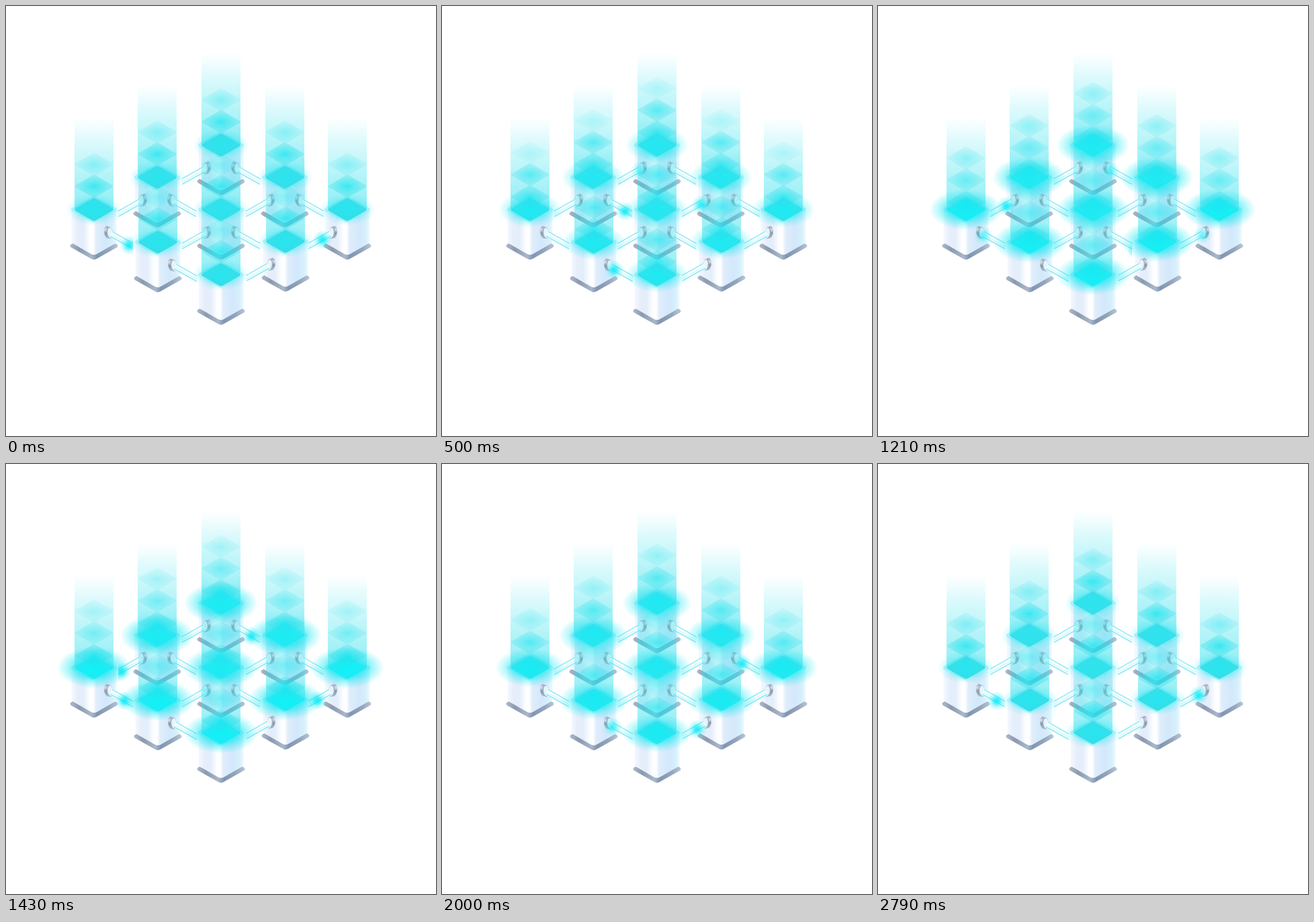
An HTML page with a canvas that plays this animation: 640x640 px, repeating every 2.87 s.

```html
<!DOCTYPE html>
<html lang="en">
<head>
<meta charset="utf-8">
<title>Linked cubes</title>
<style>
html, body { margin: 0; width: 100%; height: 100%; overflow: hidden; background: #fff; }
canvas { display: block; width: 100vw; height: 100vh; }
</style>
</head>
<body>
<canvas id="stage" width="640" height="640"></canvas>
<script>
(() => {
const ctx = document.getElementById('stage').getContext('2d');
const LOOP = 2870, STEPS = 40;
const SPEED = 0.09;   // pulse travel along x, px per ms
const RISE = 99, BEAM = 137;

// Top-face centre, then the start times of pulses in the left and right pipes.
const cubes = [
  { x: 320, y: 207, left: [455, 2068], right: [1166, 2212] },
  { x: 225, y: 255, left: [1077], right: [211, 2123] },
  { x: 415, y: 255, left: [411], right: [1890] },
  { x: 131, y: 303, right: [1166, 2525] },
  { x: 320, y: 303, left: [1432, 2257], right: [735] },
  { x: 508, y: 303, left: [1175, 2692] },
  { x: 226, y: 351.5, right: [400, 1935] },
  { x: 416, y: 350.5, left: [557, 1840] },
  { x: 320, y: 400 }
];

// Rising plates: phase and strength
const plates = [[0.02, 0.78], [0.68, 0.9], [0.35, 1.15]];

const cyan = a => `rgba(20,232,242,${a})`;

function fade(gradient, ...stops) {
  for (const [at, color] of stops) gradient.addColorStop(at, color);
  return gradient;
}

function diamond(y, w, h, r) {
  ctx.beginPath();
  ctx.moveTo(-w / 2, y - h / 2);
  ctx.arcTo(0, y - h, w, y, r);
  ctx.arcTo(w, y, 0, y + h, r * 0.35);
  ctx.arcTo(0, y + h, -w, y, r);
  ctx.arcTo(-w, y, 0, y - h, r * 0.35);
  ctx.closePath();
}

function glow(x, y, rx, ry, ...stops) {
  ctx.save();
  ctx.translate(x, y);
  ctx.scale(rx, ry);
  ctx.fillStyle = fade(ctx.createRadialGradient(0, 0, 0, 0, 0, 1), ...stops);
  ctx.fillRect(-1, -1, 2, 2);
  ctx.restore();
}

function drawBody() {
  diamond(54, 38, 21.5, 7);
  ctx.fillStyle = fade(ctx.createLinearGradient(-37, 0, 37, 0),
    [0, '#b3bdcc'], [0.2, '#8b99af'], [0.45, '#a9b8cb'], [0.56, '#8295b0'], [0.8, '#95a6bd'], [1, '#bccada']);
  ctx.fill();

  ctx.beginPath();
  ctx.moveTo(-33.5, 0);
  ctx.lineTo(0, -18);
  ctx.lineTo(33.5, 0);
  ctx.arcTo(33.5, 49.5, 0, 68, 3);
  ctx.arcTo(0, 68.5, -33.5, 49.5, 9);
  ctx.arcTo(-33.5, 49.5, -33.5, 0, 3);
  ctx.closePath();
  ctx.fillStyle = fade(ctx.createLinearGradient(-34, 0, 34, 0),
    [0, '#f6faff'], [0.14, '#e6eefb'], [0.27, '#e4edfa'], [0.4, '#fbfdff'], [0.48, '#ffffff'],
    [0.55, '#e0edfb'], [0.75, '#d3e8fb'], [0.9, '#d6effc'], [1, '#eefaff']);
  ctx.fill();
}

function drawFace(p) {
  const rx = 42 + 13 * p;
  diamond(0, 37, 20.5, 8);
  ctx.fillStyle = 'rgba(196,241,250,0.9)';
  ctx.fill();
  glow(0, 0, rx, rx * 0.56,
    [0, cyan(0.5 + 0.3 * p)], [0.5, cyan(0.4 + 0.25 * p)], [0.75, cyan(0.16 + 0.14 * p)], [1, cyan(0)]);
  diamond(0, 30.5, 17.5, 6);
  ctx.fillStyle = `rgb(${50 - 38 * p},${218 + 22 * p},${228 + 17 * p})`;
  ctx.fill();
}

function drawBeam(p) {
  ctx.beginPath();
  ctx.moveTo(-29, -BEAM);
  ctx.lineTo(29, -BEAM);
  ctx.lineTo(29, 0);
  ctx.lineTo(0, 17);
  ctx.lineTo(-29, 0);
  ctx.closePath();
  ctx.fillStyle = fade(ctx.createLinearGradient(0, -BEAM, 0, 17),
    [0, 'rgba(60,226,238,0)'], [0.25, 'rgba(60,226,238,0.19)'],
    [0.6, 'rgba(60,226,238,0.41)'], [0.88, 'rgba(60,226,238,0.58)'], [1, 'rgba(60,226,238,0.3)']);
  ctx.fill();
  glow(0, 0, 28, 16, [0, `rgba(5,245,250,${0.3 + 0.5 * p})`], [1, 'rgba(5,245,250,0)']);
}

function drawPlate(t, phase, power) {
  const u = (t / LOOP + phase) % 1;
  const a = power * Math.min(1, u * 8) * Math.pow(1 - u, 0.85);
  ctx.save();
  ctx.translate(0, -RISE * u);
  diamond(0, 30, 17.5, 6);
  ctx.clip();
  ctx.fillStyle = `rgba(50,218,230,${0.36 * a})`;
  ctx.fillRect(-30, -18, 60, 36);
  glow(0, 0, 23, 14, [0, cyan(Math.min(1, 0.85 * a))], [0.35, cyan(0.5 * a)], [1, cyan(0)]);
  ctx.restore();
}

function line(x1, y1, x2, y2, width, color) {
  ctx.beginPath();
  ctx.moveTo(x1, y1);
  ctx.lineTo(x2, y2);
  ctx.lineWidth = width;
  ctx.strokeStyle = color;
  ctx.stroke();
}

function oval(x, y, rx, ry, fill) {
  ctx.beginPath();
  ctx.ellipse(x, y, rx, ry, -0.12, 0, 7);
  ctx.fillStyle = fill;
  ctx.fill();
}

function drawPipe(side, starts, t) {
  ctx.save();
  ctx.scale(side, 1);
  ctx.translate(21, 34);

  const metal = fade(ctx.createLinearGradient(0, -10, 0, 10),
    [0, '#8f9fb2'], [0.3, '#d5dee8'], [0.55, '#8796a9'], [1, '#b9c6d4']);
  oval(-1, -0.3, 4.8, 9.3, metal);
  oval(2.2, 0.6, 4.4, 8.8, '#9aaec1');
  oval(3, 0.8, 3.8, 7.8, '#e6f4fa');

  line(4, 2, 37, 20.5, 10, 'rgba(222,247,252,0.85)');
  line(4, 2, 37, 20.5, 7, '#fafeff');
  line(6, -1.3, 37, 16.2, 1.3, '#83e9f2');
  line(3, 5.4, 37, 24.4, 1.3, '#83e9f2');
  line(5, 3.2, 37, 21.2, 1, 'rgba(150,236,245,0.55)');

  // Pulses vanish at the edge of the next cube.
  ctx.beginPath();
  ctx.rect(-16, -20, 53, 64);
  ctx.clip();
  for (const start of starts) {
    const d = ((t - start + LOOP) % LOOP) * SPEED;
    if (d > 54) continue;
    const a = Math.min(1, 0.25 + d / 12);
    glow(d, 2 + d * 0.55, 14.5, 14.5,
      [0, `rgba(10,238,250,${0.95 * a})`], [0.28, `rgba(20,236,248,${0.75 * a})`],
      [0.6, cyan(0.28 * a)], [1, cyan(0)]);
  }
  ctx.restore();
}

function draw(t) {
  const p = Math.pow(Math.sin(Math.PI * t / LOOP), 1.4);
  ctx.clearRect(0, 0, 640, 640);
  for (const c of cubes) {
    ctx.save();
    ctx.translate(c.x, c.y);
    drawBody();
    drawFace(p);
    drawBeam(p);
    for (const [phase, power] of plates) drawPlate(t, phase, power);
    if (c.left) drawPipe(-1, c.left, t);
    if (c.right) drawPipe(1, c.right, t);
    ctx.restore();
  }
}

let shown = -1;
function tick() {
  const step = Math.floor((performance.now() % LOOP + 13) * STEPS / LOOP) % STEPS;
  if (step !== shown) draw(step * LOOP / STEPS);
  shown = step;
  requestAnimationFrame(tick);
}
tick();
})();
</script>
</body>
</html>
```
